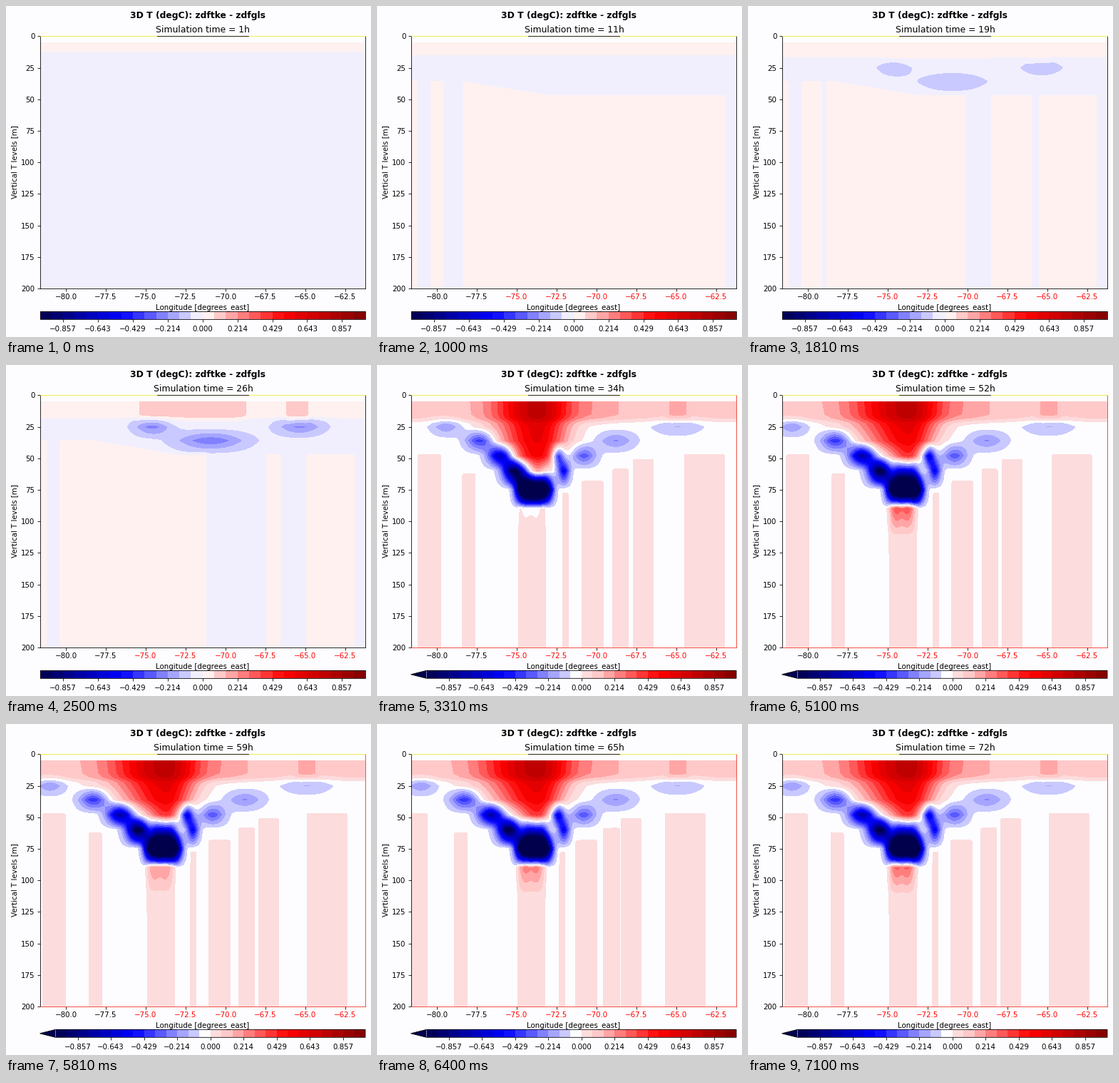
These frames come from a looping animation (512 by 464 pixels, 7200 ms). A matplotlib script:

```python
import numpy as np
import matplotlib.pyplot as plt
from matplotlib.animation import FuncAnimation
from matplotlib.patches import Polygon, Rectangle

W, H, DPI = 512, 464, 80
HOURS = 72
LEFT, RIGHT, TOP, BOTTOM = 47.5, 504, 42.3, 396
BAR_TOP, BAR_BOTTOM, TIP = 428.3, 439.3, 69.5
SMALL, LARGE, THIN, TICK = 9.27, 11.1, 0.74, 3.24   # points
PAPER = "#fdfdff"

plt.rcParams.update({
    "font.family": "DejaVu Sans", "font.size": SMALL, "axes.linewidth": THIN,
    "xtick.major.width": THIN, "ytick.major.width": THIN,
    "xtick.major.size": TICK, "ytick.major.size": TICK,
    "xtick.major.pad": TICK, "ytick.major.pad": TICK,
})

# Horizontal positions are stage pixels, vertical ones are metres of depth.
# Strong anomalies live on the model depths and are linear in between.
X = np.linspace(LEFT, RIGHT, 153)
Z = np.r_[5:95:1, 95:201:5].astype(float)
XX, ZZ = np.meshgrid(X, Z)
DEPTHS = np.array([5, 15, 25, 36, 48, 60, 75, 90, 110, 130, 200])
LIFT = np.array([np.interp(Z, DEPTHS, unit) for unit in np.eye(len(DEPTHS))]).T
SKIN = np.clip((25 - DEPTHS[:, None]) / 10, 0, 1)
LEVELS = np.arange(-14, 15)
EYE = 222   # storm centre


def bump(x, width, power=2):
    return np.exp(-np.abs((X - x) / width) ** power)


def eddy(x, depth, amp, width, power=2):
    """Anomaly centred on one model depth."""
    return amp * (DEPTHS == depth)[:, None] * bump(x, width, power)


def onset():
    """Shallow cold lenses below two warm surface patches."""
    patches = bump(262, 76, 12) + bump(408.5, 15.5, 12)
    return (eddy(205, 25, -3, 27) + eddy(287, 36, -3.4, 50)
            + eddy(412, 25, -2.8, 34) + 1.1 * SKIN * patches)


def plume(reach, spread):
    """Warm bowl, wider to the west, that closes at the reach."""
    z = DEPTHS[:, None] - 5
    taper = np.sqrt(np.clip(1 - (z / reach) ** 2, 0, 1))
    width = np.where(X < 225, 75 * spread, 45) * taper + .1
    bowl = 9.2 * taper ** .4 * np.exp(-((X - 225) / width) ** 2)
    return bowl + SKIN * (.8 + 1.2 * bump(305, 45) + bump(422, 15, 4))


def cold_arms(spread):
    """Two chains of eddies rising outwards from the cold core."""
    west, east = (37, 62, 99, 160), (40, 68, 113, 200)
    total = eddy(220, 75, -24, 25, 4) + eddy(254, 48, -8, 9)
    for k, depth in enumerate((60, 48, 36, 25), start=1):
        total += eddy(EYE - spread * west[k - 1], depth,
                      -17 * np.exp(-.12 * k * k), 14 + 2 * k)
        total += eddy(EYE + east[k - 1], depth, -12 * np.exp(-.5 * k), 9 * k)
    return total


def storm(hour):
    age = np.clip((hour - 34) / 10, 0, 1)
    spread = .78 + .22 * age
    total = plume(58 - 12 * age, spread) + cold_arms(spread)
    total += eddy(EYE, 60, -3 - 5 * age, 18, 4)
    base = np.interp(hour, (34, 44, 59, 72), (-.12, 1, .4, .6))
    for x in (208, 224):
        total += eddy(x, 90, 6 * base, 9) + eddy(x, 110, .7 * base, 9)
    return total


def band(center, half):
    """Positive inside a vertical strip."""
    return (half - np.abs(XX - center)) / 6


def calm_weak(hour):
    """Weak warm interior, split by cold gaps that open and close."""
    grown = np.clip((hour - 11) / 15, 0, 1)
    top = 36 + 11 * np.clip((XX - 120) / 120, 0, 1)
    field = (ZZ - top) / 4
    for center, half in ((66, 9), (107, 14 - 20 * grown), (497, 8),
                         (323, 50 * grown - 8), (403, 26 * grown - 8)):
        field = np.minimum(field, -band(center, half))
    return np.clip(field, -.5, .5)


def storm_weak(hour):
    """Weak warm columns that sway, deeper the closer to the storm."""
    sway = np.cos(2 * np.pi * (hour - 34) / 21)
    field = np.full(XX.shape, -.5)
    for center, half in ((64, 16), (123, 9), (217, 19), (262, 4),
                         (298, 15), (335, 11), (365, 14), (446, 28)):
        gap = abs(center - EYE)
        top = max(47, 88 - .26 * gap)
        column = band(center + .06 * gap * sway, half)
        field = np.maximum(field, np.minimum(column, (ZZ - top) / 4))
    return np.clip(field, -.5, .5)


def anomaly(hour):
    early = np.interp(hour, (1, 11), (0, 1))
    late = np.interp(hour, (26, 34), (0, 1))
    weak = (1 - early) * -.5 + early * calm_weak(hour)
    weak += late * (storm_weak(hour) - weak)
    skin = np.interp(hour, (1, 34), (12.5, 20))
    weak = np.maximum(weak, np.clip((skin - ZZ) / 4, -.5, .5))
    lens = np.interp(hour, (14, 26, 34), (0, 1, 0))
    return LIFT @ (lens * onset() + late * storm(hour)) + weak


def palette(cold, warm):
    colors = [plt.cm.seismic((k + .5) / 28) for k in range(28)]
    colors[13:15] = [tuple(c / 255 for c in tone) for tone in (cold, warm)]
    return [plt.cm.seismic(0.0)] + colors + [plt.cm.seismic(1.0)]


CALM_COLORS = palette((241, 239, 253), (254, 241, 240))
STORM_COLORS = palette((253, 253, 255), (252, 220, 221))

fig = plt.figure(figsize=(W / DPI, H / DPI), dpi=DPI, facecolor=PAPER)


def box(left, top, right, bottom):
    return fig.add_axes((left / W, 1 - bottom / H, (right - left) / W,
                         (bottom - top) / H), facecolor=PAPER)


def label(x, y, text, size=SMALL, **kw):
    kw = {"ha": "center", "va": "baseline", **kw}
    return fig.text(x / W, 1 - y / H, text, fontsize=size, **kw)


def minus(value, digits):
    return f"{value:.{digits}f}".replace("-", "\u2212")


ax = box(LEFT, TOP, RIGHT, BOTTOM)
ax.set(xlim=(LEFT, RIGHT), ylim=(200, 0), yticks=range(0, 201, 25))
LONS = np.arange(-80, -62, 2.5)
ax.set_xticks(84 + 22.4 * (LONS + 80), [minus(v, 1) for v in LONS])
ax.spines["top"].set_color("#f0e62c")
ax.plot((212, 340), (0, 0), color="black", lw=THIN, clip_on=False, zorder=4)

label(269, 17, "3D T (degC): zdftke - zdfgls", LARGE, weight="bold")
clock = label(276.5, 37, "", LARGE)
label(275.8, 425.3, "Longitude [degrees_east]")
label(12, 219, "Vertical T levels [m]", rotation=90, va="center")

bar = box(LEFT, BAR_TOP, RIGHT, BAR_BOTTOM)
bar.set(xlim=(LEFT, RIGHT), ylim=(0, 1), yticks=[])
bar.tick_params(axis="x", pad=TICK + 1)
bar.spines[:].set_visible(False)
cells = [bar.add_patch(Rectangle((0, 0), 1, 1, lw=0, antialiased=False))
         for _ in range(28)]
arrow = bar.add_patch(Polygon([(LEFT, .5), (TIP, 0), (TIP, 1)], lw=0,
                              color=CALM_COLORS[0]))
frame = bar.add_patch(Polygon([(0, 0), (1, 1), (1, 0)], fill=False, ec="black",
                              lw=THIN, clip_on=False))
MARKS = np.arange(-12, 13, 3)
shown = []


def paint_bar(colors, extended):
    start = TIP if extended else LEFT
    step = (RIGHT - start) / 28
    for k, cell in enumerate(cells):
        cell.set(x=start + k * step, width=step, facecolor=colors[k + 1])
    arrow.set_visible(extended)
    tip = [(LEFT, .5)] if extended else []
    frame.set_xy([(start, 0), (RIGHT, 0), (RIGHT, 1), (start, 1)] + tip)
    bar.set_xticks(start + (MARKS + 14) * step, [minus(m / 14, 3) for m in MARKS])


def draw(i):
    hour = i + 1
    field = anomaly(hour)
    extended = bool(field.min() < -14)
    colors = STORM_COLORS if extended else CALM_COLORS
    while shown:
        shown.pop().remove()
    shown.append(ax.contourf(X, Z, field, LEVELS, colors=colors, extend="both"))
    paint_bar(colors, extended)
    clock.set_text(f"Simulation time = {hour}h")
    for text, lon in zip(ax.get_xticklabels(), LONS):
        text.set_color("red" if hour > 5 and lon >= -75 else "black")
    for side in ("right", "bottom"):
        ax.spines[side].set_color("#f03020" if extended else "black")
    return []


anim = FuncAnimation(fig, draw, frames=HOURS, interval=100, init_func=lambda: [],
                     repeat=True, repeat_delay=0, blit=False)
plt.show()
```
